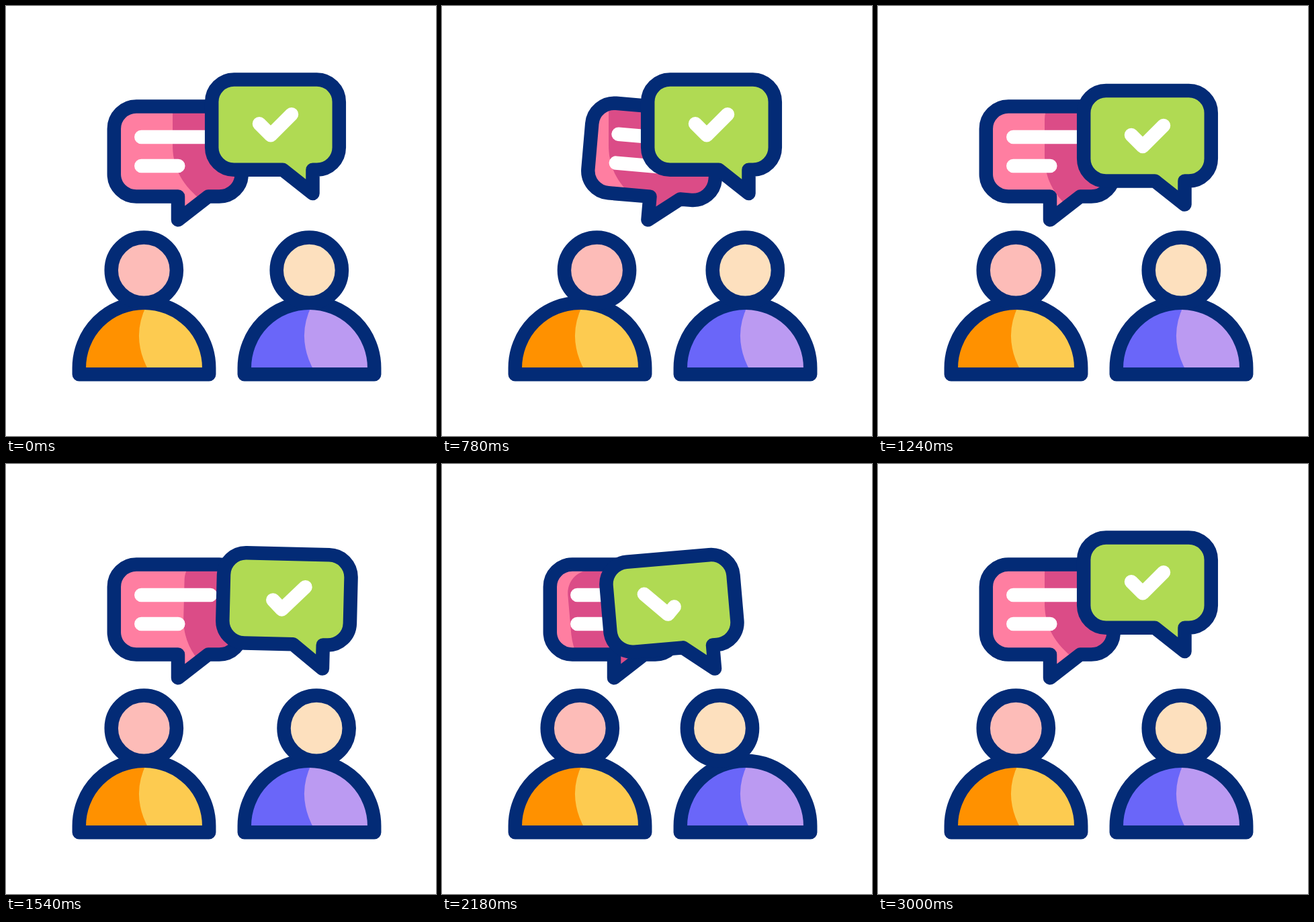
Recreate the animation shown at these times as an HTML page. Size 640 px wide and 640 px high, loop 3.22 s.

```html
<!DOCTYPE html>
<html lang="en">
<head>
<meta charset="utf-8">
<title>Conversation</title>
<style>
  html, body { margin: 0; width: 100%; height: 100%; overflow: hidden; background: #fff; }
  svg { display: block; width: 100%; height: 100%; }
  .line { fill: none; stroke: #032b76; stroke-width: 20.5; stroke-linecap: round; stroke-linejoin: round; }
  .mark { fill: none; stroke: #fff; stroke-width: 20.5; stroke-linecap: round; stroke-linejoin: round; }
</style>
</head>
<body>
<svg viewBox="0 0 640 640">
  <defs>
    <path id="askShape" d="M194 149.5H317.5A33.2 33.2 0 0 1 350.7 182.7V250.3A33.2 33.2 0 0 1 317.5 283.5H301L256 318.3V283.5H194A33.2 33.2 0 0 1 160.8 250.3V182.7A33.2 33.2 0 0 1 194 149.5Z"/>
    <path id="replyShape" d="M339.4 109.5H462.6A33.2 33.2 0 0 1 495.8 142.7V210.6A33.2 33.2 0 0 1 462.6 243.8H456.5V279L412 243.8H339.4A33.2 33.2 0 0 1 306.2 210.6V142.7A33.2 33.2 0 0 1 339.4 109.5Z"/>
    <path id="torso" d="M108.8 548.2V538.5A96.7 96.7 0 0 1 302.2 538.5V548.2Z"/>
    <path id="torsoLight" d="M209 446Q185 494 213 544H302V538.5A96.7 96.7 0 0 0 209 442Z"/>
    <clipPath id="askClip"><use id="askClipShape" href="#askShape"/></clipPath>
  </defs>

  <g>
    <use href="#torso" fill="#ff9100"/>
    <use href="#torsoLight" fill="#fdcb50"/>
    <use href="#torso" class="line"/>
    <circle id="headA" class="line" cx="205.3" cy="393.2" r="48.6" style="fill:#fdbcb8"/>
  </g>
  <g transform="translate(246)">
    <use href="#torso" fill="#6a66f9"/>
    <use href="#torsoLight" fill="#bb9af2"/>
    <use href="#torso" class="line"/>
    <circle id="headB" class="line" cx="205.3" cy="393.2" r="48.6" style="fill:#fde0be"/>
  </g>

  <g clip-path="url(#askClip)">
    <rect width="640" height="640" fill="#ff7ea1"/>
    <path id="shade" fill="#db4c87" d="M248 152C248 133 262 117 283 117H640V345H400L292 290C264 268 248 243 248 207Z"/>
  </g>
  <g id="ask">
    <use href="#askShape" class="line"/>
    <path id="bars" class="mark"/>
  </g>
  <g id="reply">
    <use href="#replyShape" class="line" style="fill:#b0da53"/>
    <path id="check" class="mark"/>
  </g>
</svg>
<script>
const LOOP = 3220, STEP = 400, TICK = 20;
const el = id => document.getElementById(id);

const ease = u => u * u * (3 - 2 * u);

// Eased value through evenly spaced keys, the first one at time `start`.
function track(t, start, ...keys) {
  const pos = Math.min(Math.max((t - start) / STEP, 0), keys.length - 1);
  const i = Math.min(Math.floor(pos), keys.length - 2);
  return keys[i] + (keys[i + 1] - keys[i]) * ease(pos - i);
}

// Slide and tilt a bubble around the tip of its tail.
const sway = (side, drop, tipX, tipY) =>
  `translate(${51.2 * side} ${drop}) rotate(${5 * side} ${tipX} ${tipY})`;

function draw(t) {
  const sideA = track(t, 0, 0, -1, 1, 0);
  const sideB = track(t, 1400, 0, 1, -1, 0);
  const drop = track(t, 1000, 0, 25.6) - track(t, 2600, 0, 25.6);

  const askMove = sway(sideA, 0, 256, 318.3);
  const replyMove = sway(sideB, drop, 456.5, 279);
  for (const id of ["ask", "askClipShape"]) el(id).setAttribute("transform", askMove);
  for (const id of ["reply", "shade"]) el(id).setAttribute("transform", replyMove);
  el("headA").setAttribute("transform", `translate(${25.6 * sideA})`);
  el("headB").setAttribute("transform", `translate(${38.4 * sideB})`);

  const longBar = track(t, 0, 103, 19, 112, 103);
  const shortBar = track(t, 0, 55, 22, 80, 55);
  el("bars").setAttribute("d", `M201.3 195h${longBar}M201.3 238h${shortBar}`);

  const left = track(t, 1400, 17, 5, 33, 17);
  const right = track(t, 1400, 31, 42, 10, 31);
  el("check").setAttribute("d",
    `M${394 - left} ${192.3 - left}L394 192.3L${394 + right} ${192.3 - right}`);
}

const begin = performance.now();
function frame() {
  const t = (performance.now() - begin) % LOOP;
  draw(Math.floor(t / TICK) * TICK);
  requestAnimationFrame(frame);
}
draw(0);
requestAnimationFrame(frame);
</script>
</body>
</html>
```
